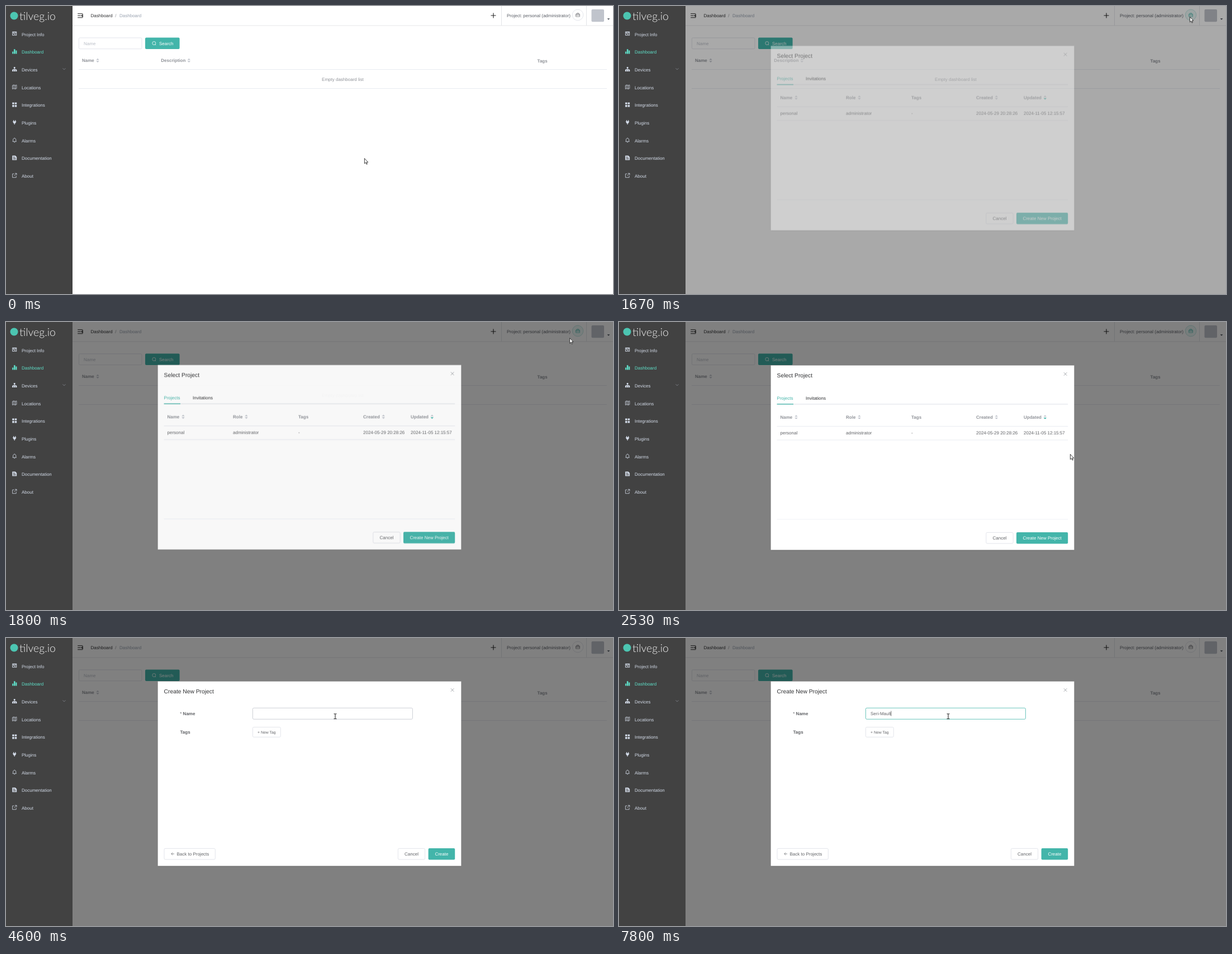
Animation, 1086 px wide and 515 px high, one loop 8 s. Source, as an HTML page with a canvas:

```html
<!DOCTYPE html>
<html lang="en">
<head>
<meta charset="utf-8">
<title>Dashboard</title>
<style>
html, body { margin: 0; width: 100%; height: 100%; overflow: hidden; background: #fff; }
canvas { display: block; }
</style>
</head>
<body>
<canvas id="stage" width="1086" height="515"></canvas>
<script>
const W = 1086, H = 515, LOOP = 8000, K = 4 / 7;
const TEAL = '#43b5aa', GREY = '#909399', BODY = '#606266', DARK = '#303133',
      BORDER = '#dcdfe6', PALE = '#c0c4cc', RULE = '#ebeef5';
const stage = document.getElementById('stage').getContext('2d');
const layer = document.createElement('canvas');
layer.width = W;
layer.height = H;
const modal = layer.getContext('2d');
let g = stage;

const OPEN = 1591, PRESS = 1530, RELEASE = 1660, SWITCH = 3470, FOCUS = 4800;
const PROJECT = 'Seri-Mault';
const KEYS = [5470, 5930, 6130, 6330, 6730, 7000, 7330, 7470, 7600, 7800];
const PATH = [
  [0, 641, 272], [870, 983, 55], [1330, 1021, 19], [1670, 1021, 19], [1730, 1018, 22],
  [2330, 842, 127], [2530, 807, 236], [3240, 760, 385], [3540, 760, 385],
  [4070, 650, 219], [4600, 589, 140], [8000, 589, 140]
];

const clamp = v => Math.max(0, Math.min(1, v));

// CSS "ease": cubic-bezier(.25, .1, .25, 1)
function ease(x) {
  x = clamp(x);
  let lo = 0, hi = 1;
  for (let i = 0; i < 24; i++) {
    const s = (lo + hi) / 2, r = 1 - s;
    if (0.75 * r * s + s * s * s < x) lo = s; else hi = s;
  }
  const s = lo, r = 1 - s;
  return 0.3 * r * r * s + 3 * r * s * s + s * s * s;
}

// The picture advances 15 times a second, on times rounded to 10 ms
function tick(t) {
  const at = n => Math.round(n * 100 / 15) * 10;
  let n = Math.ceil(t * 0.015);
  if (at(n) > t) n--;
  return at(n);
}

// Monotone cubic through the pointer path
function track(t, axis) {
  const secant = i => i < 0 || i > PATH.length - 2 ? 0 :
    (PATH[i + 1][axis] - PATH[i][axis]) / (PATH[i + 1][0] - PATH[i][0]);
  const slope = i => {
    const a = secant(i - 1), b = secant(i);
    return a * b > 0 ? 2 * a * b / (a + b) : i === 0 ? b * 0.5 : 0;
  };
  let i = 0;
  while (i < PATH.length - 2 && t >= PATH[i + 1][0]) i++;
  const d = PATH[i + 1][0] - PATH[i][0], u = (t - PATH[i][0]) / d, v = 1 - u;
  return v * v * (1 + 2 * u) * PATH[i][axis] + u * v * v * d * slope(i) +
    u * u * (3 - 2 * u) * PATH[i + 1][axis] - u * u * v * d * slope(i + 1);
}

function mix(a, b, p) {
  const part = (c, i) => parseInt(c.slice(i, i + 2), 16);
  return 'rgb(' + [1, 3, 5].map(i => Math.round(part(a, i) + (part(b, i) - part(a, i)) * p)) + ')';
}

// Sizes are given in page pixels; the page is shown at 4/7 scale
function text(s, x, y, color, size = 14, weight = 400, align = 'left',
              family = '"Liberation Sans", Arial, sans-serif') {
  g.save();
  g.translate(x, y);
  g.scale(K, K);
  g.font = `${weight} ${size}px ${family}`;
  g.textRendering = 'geometricPrecision';
  g.textAlign = align;
  g.fillStyle = color;
  g.fillText(s, 0, 0);
  const w = g.measureText(s).width * K;
  g.restore();
  return w;
}

function rect(x, y, w, h, color) {
  g.fillStyle = color;
  g.fillRect(x, y, w, h);
}

function box(x, y, w, h, fill, border) {
  g.beginPath();
  g.roundRect(x, y, w, h, 2);
  g.fillStyle = fill;
  g.fill();
  if (border) {
    g.strokeStyle = border;
    g.lineWidth = 0.8;
    g.stroke();
  }
}

function shape(d, x, y, { fill, stroke, width = 0.9 }) {
  g.save();
  g.translate(x, y);
  const p = new Path2D(d);
  if (fill) {
    g.fillStyle = fill;
    g.fill(p, 'evenodd');
  }
  if (stroke) {
    g.strokeStyle = stroke;
    g.lineWidth = width;
    g.stroke(p);
  }
  g.restore();
}

function button(label, x, y, w, h, { primary, hover, size = 14 } = {}) {
  if (primary) box(x, y, w, h, hover ? '#69c4bb' : TEAL);
  else box(x + 0.4, y + 0.4, w - 0.8, h - 0.8, '#fff', BORDER);
  text(label, x + w / 2, y + h / 2 + size * 0.2, primary ? '#fff' : BODY, size, 400, 'center');
}

function heading(label, x, y, sort, active) {
  text(label, x, y, GREY, 14, 700);
  if (!sort) return;
  shape('M-2.7 -.9L0 -3.6L2.7 -.9Z', sort, y - 3, { fill: PALE });
  shape('M-2.7 .9L0 3.6L2.7 .9Z', sort, y - 3, { fill: active ? TEAL : PALE });
}

const MENU = [
  ['Project Info', 'M-4 -4H4V3H-4ZM-3 -2.6V2H3V-2.6ZM-2.4 -2H-.4V-.4H-2.4ZM-.4 -.4H1.6V1.2H-.4ZM1 -2.2H2.4V-1H1Z'],
  ['Dashboard', 'M-4 0H-1.9V4H-4ZM-1.2 -4.3H1.3V4H-1.2ZM2 -2H4.2V4H2Z'],
  ['Devices', 'M-1.3 -4H1.3V-1.4H-1.3ZM-.4 -1.4H.4V0H3.4V1.2H4.2V3.8H1.8V1.2H2.6V.8H.4V1.2H1.2V3.8H-1.2V1.2H-.4V.8H-2.6V1.2H-1.8V3.8H-4.2V1.2H-3.4V0H-.4Z'],
  ['Locations', 'M-3.7 -2.8L-1.3 -3.6L1.3 -2.8L3.7 -3.6V2.8L1.3 3.6L-1.3 2.8L-3.7 3.6ZM-1.3 -3.6V2.8M1.3 -2.8V3.6', 1],
  ['Integrations', 'M-4 -4H-.5V-.6H-4ZM.6 -4H4V-.6H.6ZM-4 .5H-.5V4H-4ZM.6 .5H4V4H.6Z'],
  ['Plugins', 'M-2.2 -4.2H-1V-2H1V-4.2H2.2V-2H3V-.8H2.6C2.6 1 1.6 1.8 .6 2V4H-.6V2C-1.6 1.8 -2.6 1 -2.6 -.8H-3V-2H-2.2Z'],
  ['Alarms', 'M-3.6 2.5H3.6M-2.6 2.5V-.6C-2.6 -4 2.6 -4 2.6 -.6V2.5M0 -3.2V-4.2M-1 3.9H1', 1],
  ['Documentation', 'M-4 -4H1.4L4 -1.4V4H-4ZM-2.4 -1.8V-1H.4V-1.8ZM-2.4 .2V1H2.4V.2ZM-2.4 2V2.8H2.4V2Z'],
  ['About', 'M-.5 -3H-3.6V3.6H3V.5M.8 -3.8H3.8V-.8M3.8 -3.8L-.6 .6', 1]
];

function sidebar() {
  rect(0, 0, 119, H, '#424242');
  g.beginPath();
  g.arc(14.5, 17.5, 7, 0, 7);
  g.fillStyle = '#4cc5b1';
  g.fill();
  text('tilveg.io', 24, 25, '#f4f4f4', 34, 300, 'left', 'Lato, sans-serif');
  MENU.forEach(([label, icon, line], i) => {
    const y = 50.8 + i * 31.66, color = i === 1 ? '#5fe0c9' : '#d3dbe8';
    shape(icon, 15.2, y - 1, line ? { stroke: color, width: 0.8 } : { fill: color });
    text(label, 28, y + 2.9, color);
  });
  shape('M-2.5 -1.2L0 1.3L2.5 -1.2', 104, 112.5, { stroke: '#9299a3', width: 0.7 });
}

function header(t, near) {
  rect(119, 34.5, 967, 1, '#e6e7ea');
  shape('M-4.5 -3.5H4.5M-4.5 0H1M-4.5 3.5H4.5M4.5 -2L2.2 0L4.5 2Z', 132.7, 17.3,
    { stroke: '#222', width: 1.1 });
  text('Dashboard', 151.5, 19.9, DARK);
  text('/', 195.3, 19.9, GREY);
  text('Dashboard', 203, 19.9, '#97a0ae');
  shape('M-4.5 0H4.5M0 -4.5V4.5', 872, 17, { stroke: '#222', width: 1.1 });
  rect(886, 0, 0.9, 35, '#e0e2e6');
  rect(1038, 0, 0.9, 35, '#e0e2e6');
  text('Project: personal (administrator)', 896, 19.9, '#5a5e66');

  const lit = t < SWITCH && (near || t >= PRESS), pressed = t >= PRESS && t < RELEASE;
  g.beginPath();
  g.arc(1023, 16, 9.8, 0, 7);
  g.fillStyle = lit ? '#ecf8f7' : '#fff';
  g.fill();
  g.strokeStyle = pressed ? TEAL : lit ? '#b4e1dd' : BORDER;
  g.lineWidth = 0.8;
  g.stroke();
  shape('M-3.4 -1.6H3.4V3H-3.4ZM-1.6 -1.6V-3.2H1.6V-1.6M-3.4 .3H3.4', 1023, 16,
    { stroke: lit ? TEAL : BODY, width: 0.7 });

  box(1047.5, 6, 22.5, 22.3, PALE);
  shape('M-2.4 -1.2H2.4L0 1.3Z', 1078, 23.5, { fill: '#444a54' });
}

function page(t, near) {
  rect(0, 0, W, H, '#fff');
  header(t, near);
  box(130.4, 56.9, 112.6, 19.8, '#fff', BORDER);
  text('Name', 139, 69.7, '#b9bdc6');
  box(249, 56.5, 61.6, 20.4, TEAL);
  shape('M3 0A3 3 0 1 1 -3 0A3 3 0 1 1 3 0M2 2.2L3.4 3.6', 264.8, 66.5, { stroke: '#fff', width: 0.8 });
  text('Search', 274, 69.7, '#fff');
  heading('Name', 136, 100.3, 164);
  heading('Description', 277.3, 100.3, 327.3);
  heading('Tags', 950.6, 100.8);
  rect(130, 113, 945, 0.9, '#e6e9f0');
  rect(130, 147, 945, 0.9, '#e6e9f0');
  text('Empty dashboard list', 602.4, 133.6, GREY, 14, 400, 'center');
}

function projectList(over) {
  text('Select Project', 282.6, 99, DARK, 18);
  text('Projects', 282.6, 139, TEAL);
  text('Invitations', 334, 139, DARK);
  rect(282.6, 146.4, 520.6, 1.1, '#dfe3ea');
  rect(282.6, 146.2, 29.4, 1.3, TEAL);
  heading('Name', 288.5, 173.2, 317);
  heading('Role', 406, 173.2, 430);
  heading('Tags', 523, 173.2);
  heading('Created', 639, 173.2, 675.3);
  heading('Updated', 724, 173.2, 762.3, true);
  rect(282.6, 186, 520.6, 0.8, '#e4e7ee');
  const row = ['personal', 'administrator', '-', '2024-05-29 20:28:26', '2024-11-05 12:15:57'];
  [288.5, 406, 523, 639, 724].forEach((x, i) => text(row[i], x, 201.4, BODY));
  rect(282.6, 210.6, 520.6, 0.8, '#e4e7ee');
  rect(282.6, 352.5, 520.6, 0.8, RULE);
  button('Cancel', 656.4, 376, 49.2, 20.4);
  button('Create New Project', 711, 376, 92.2, 20.4, { primary: true, hover: over(711, 376, 92, 20) });
}

function projectForm(t, over) {
  text('Create New Project', 282.6, 99, DARK, 18);
  text('*', 311.3, 138, BODY);
  text('Name', 316.6, 138, BODY, 14, 700);
  text('Tags', 311.5, 171, BODY, 14, 700);
  const rest = over(441, 125, 287, 20.5) ? PALE : BORDER;
  box(441.4, 125.2, 286, 20, '#fff', mix(rest, TEAL, clamp((t - FOCUS + 65) / 195)));
  const typed = PROJECT.slice(0, KEYS.filter(k => k <= t).length);
  const w = text(typed, 450, 137.8, BODY);
  if (t >= FOCUS && (t < 5330 || t >= KEYS[0])) rect(450 + w, 130.5, 0.7, 9, '#333');
  button('+ New Tag', 441, 159, 50.7, 18.6, { size: 12 });

  box(283, 376.4, 91.3, 19.6, '#fff', BORDER);
  shape('M2.7 0H-2.5M-.2 -2.4L-2.6 0L-.2 2.4', 298.3, 386, { stroke: BODY, width: 0.7 });
  text('Back to Projects', 305.5, 388.9, BODY);
  button('Cancel', 701, 376, 49, 20.4);
  button('Create', 755.6, 376, 47.6, 20.4, { primary: true, hover: over(755.6, 376, 47.6, 20) });
}

function dialog(t, over) {
  const age = t - OPEN;
  rect(119, 0, W - 119, H, `rgba(0,0,0,${0.5 * ease(age / 200)})`);
  g = modal;
  g.clearRect(0, 0, W, H);
  g.save();
  g.shadowColor = 'rgba(0,0,0,.3)';
  g.shadowBlur = 2;
  g.shadowOffsetY = 0.6;
  rect(271.6, 77.6, 542.8, 330, '#fff');
  g.restore();
  shape('M-2.8 -2.8L2.8 2.8M2.8 -2.8L-2.8 2.8', 798.6, 93, { stroke: GREY, width: 0.8 });
  if (t < SWITCH) projectList(over); else projectForm(t, over);
  g = stage;
  const p = ease(age / 300);
  g.globalAlpha = p;
  g.drawImage(layer, 0, (p - 1) * 20 * K);
  g.globalAlpha = 1;
}

function draw(t) {
  const x = track(t, 1), y = track(t, 2);
  const over = (l, u, w, h) => x >= l && x <= l + w && y >= u && y <= u + h;
  page(t, Math.hypot(x - 1023, y - 16) < 10);
  if (t > OPEN) dialog(t, over);
  sidebar();
  if (t >= SWITCH && over(441, 125, 287, 20.5)) {
    shape('M-2.4 -4.3H-.6L0 -3.8L.6 -4.3H2.4M0 -3.8V4M-2.4 4.5H-.6L0 4L.6 4.5H2.4', x, y,
      { stroke: '#111', width: 1 });
  } else {
    shape('M.4 .5V9.8L2.5 7.8L4 11.1L5.4 10.5L4 7.3H6.7Z', x, y,
      { fill: '#fff', stroke: '#111', width: 0.8 });
  }
}

let start;
function frame(now) {
  if (start === undefined) start = now;
  draw(tick(Math.max(0, now - start) % LOOP));
  requestAnimationFrame(frame);
}
requestAnimationFrame(frame);
</script>
</body>
</html>
```
